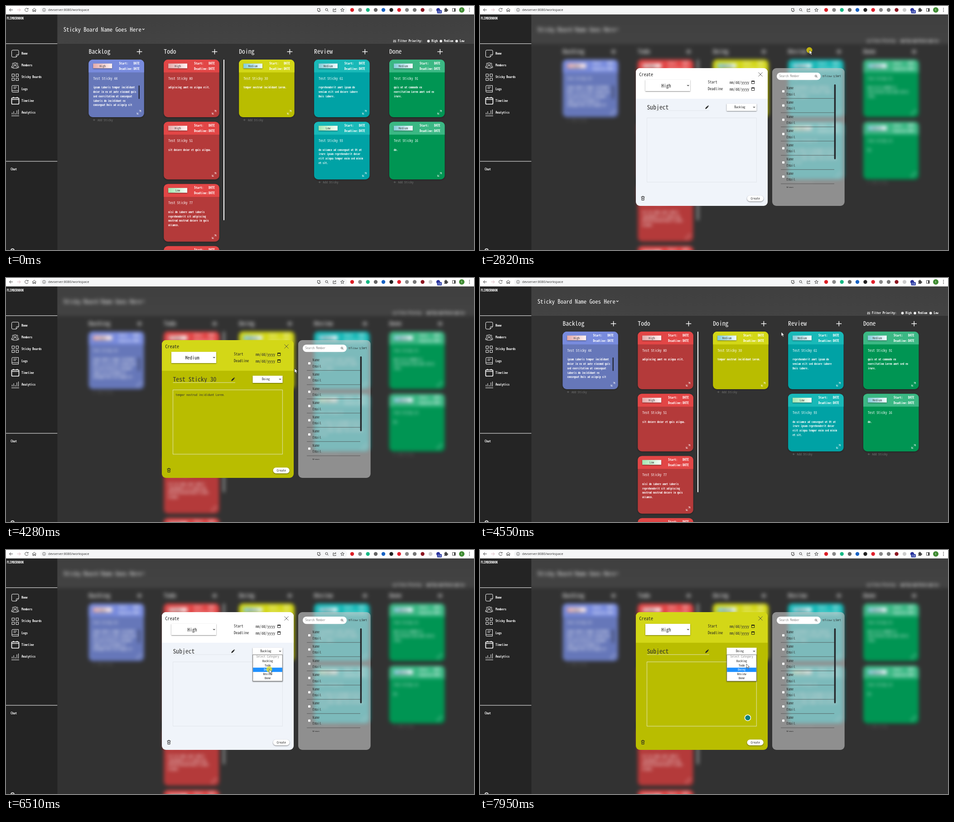
Animation, 1033 px wide and 542 px high, one loop 8 s. Source, as an HTML page:

```html
<!DOCTYPE html>
<html lang="en">
<head>
<meta charset="utf-8">
<title>Sticky board</title>
<style>
html, body { margin: 0; width: 100%; height: 100%; overflow: hidden; background: #323232; }
svg { display: block; width: 1033px; height: 542px; }
text { font-family: "Noto Sans Mono CJK JP", "Noto Sans Mono CJK SC", "Noto Sans Mono", monospace; white-space: pre; }
.ui { font-family: "Open Sans", sans-serif; }
.line { fill: none; stroke: #fff; }
.dark { fill: none; stroke: #444; }
.raised { filter: drop-shadow(0 1px 1.3px rgba(0,0,0,.5)); }
.add { fill: #707070; stroke: #707070; }
.add text { stroke: none; }
.add.hover { fill: #fff; stroke: #fff; }
.blurred { filter: blur(4px); }
</style>
</head>
<body>
<svg id="stage" viewBox="0 0 1033 542">
  <defs>
    <linearGradient id="High"><stop stop-color="#e3aaaa"/><stop offset="1" stop-color="#fff3f3"/></linearGradient>
    <linearGradient id="Medium"><stop stop-color="#83ccd8"/><stop offset="1" stop-color="#f2fcff"/></linearGradient>
    <linearGradient id="Low"><stop stop-color="#a2e6b0"/><stop offset="1" stop-color="#f8fff9"/></linearGradient>
    <linearGradient id="banner" x2="0" y2="1"><stop stop-color="#3d3d3d"/><stop offset="1" stop-color="#434343"/></linearGradient>
    <clipPath id="dialogShape"><rect x="344" y="138" width="291" height="306" rx="9"/></clipPath>
    <clipPath id="listShape"><rect x="645" y="172" width="160" height="232"/></clipPath>
  </defs>
  <g id="board"></g>
  <g id="sidebar"></g>
  <g id="browser"></g>
  <g id="modal"></g>
  <circle id="press" r="6.5" fill="#ffec00" opacity=".68"/>
  <g id="pointer">
    <path id="arrow" d="M0 0V9.2L2.2 7.3L3.7 10.7L5.3 10L3.8 6.7H6.7Z" fill="#fff" stroke="#222" stroke-width=".7"/>
    <path id="beam" d="M-1.7 -4H-.4L0 -3.6L.4 -4H1.7M0 -3.6V3.8M-1.7 4.2H-.4L0 3.8L.4 4.2H1.7" fill="none" stroke="#ddd" stroke-width=".8"/>
  </g>
</svg>
<script>
const $ = id => document.getElementById(id);
const rect = (x, y, w, h, fill, more = '') => `<rect x="${x}" y="${y}" width="${w}" height="${h}" fill="${fill}" ${more}/>`;
const circle = (x, y, r, fill, more = '') => `<circle cx="${x}" cy="${y}" r="${r}" fill="${fill}" ${more}/>`;
const line = (d, width = 1, cls = 'line', more = '') => `<path class="${cls}" d="${d}" stroke-width="${width}" ${more}/>`;
// y is the vertical middle of the capitals
const text = (x, y, size, str, fill = '#fff', more = '') =>
  `<text x="${x}" y="${y + size * .36}" font-size="${size}" ${fill ? `fill="${fill}"` : ''} ${more}>${str}</text>`;
const bold = 'font-weight="700"', middle = 'text-anchor="middle"';

// ---------- board ----------
const LEFT = 182.4, COLUMN = 165.9, ROW = 138.2;
const columns = [
  { name: 'Backlog', head: '#788bdd', body: '#6677b9', cards: [
    ['High', 44, 'ipsum laboris tempor incididunt|dolor in ex ut aute eiusmod quis|sed exercitation ut consequat|laboris do incididunt ex|consequat Duis ad aliquip sit']] },
  { name: 'Todo', head: '#e24646', body: '#b43a3a', cards: [
    ['High', 80, 'adipiscing amet ex aliqua elit.'],
    ['High', 51, 'sit dolore dolor et quis aliqua.'],
    ['Low', 77, 'nisi do labore amet laboris|reprehenderit sit adipiscing|nostrud nostrud dolore in quis|ullamco.'],
    ['High', 12, '']] },
  { name: 'Doing', head: '#d3d717', body: '#b9bd00', cards: [
    ['Medium', 30, 'tempor nostrud incididunt Lorem.']] },
  { name: 'Review', head: '#19b9b8', body: '#00a2a5', cards: [
    ['Medium', 61, 'reprehenderit amet ipsum do|veniam elit sed dolore labore|Duis labore.'],
    ['Low', 93, 'do ullamco ad consequat ut Ut ut|irure ipsum reprehenderit dolor|elit aliqua tempor enim sed minim|et sit.']] },
  { name: 'Done', head: '#3bb884', body: '#009553', cards: [
    ['Medium', 91, 'quis ut ut commodo ex|exercitation Lorem amet sed ex|irure.'],
    ['Medium', 16, 'do.']] }
];

function card(column, [priority, number, body], row) {
  const dates = ['Start:', 'Deadline:'].map((label, i) =>
    text(67, 8.3 + 12 * i, 6.8, label, '#fff', bold) + text(99, 8.3 + 12 * i, 6.8, 'DATE', '#fff', bold)).join('');
  const lines = body.split('|').map((s, i) => text(10, 62.3 + 9.75 * i, 5.95, s, '#fff', bold)).join('');
  return `<g transform="translate(0 ${119 + row * ROW})">
    ${rect(0, 0, 122.4, 128, column.body, 'rx="9" style="filter:drop-shadow(0 1px 1.5px rgba(0,0,0,.4))"')}
    <path d="M0 28.5V9A9 9 0 0 1 9 0H113.4A9 9 0 0 1 122.4 9V28.5Z" fill="${column.head}"/>
    ${rect(9.8, 8.8, 42, 10.6, `url(#${priority})`, 'class="raised"')}
    ${text(30.8, 14.2, 6.8, priority, '#444', middle)}${dates}
    ${text(10, 42.3, 7.7, 'Test Sticky ' + number)}${lines}
    ${line('M106.8 117.5V121.2H110.5M107 121L110 118M111.5 112.8H115.2V116.5M115 113L112 116', .8)}
  </g>`;
}

function drawBoard() {
  let out = rect(80, -20, 1000, 600, '#323232') + rect(80, -20, 1000, 104, 'url(#banner)') +
    text(126.7, 52, 12.75, 'Sticky Board Name Goes Here') + line('M301 50.3L303.3 52.6L305.6 50.3', 1.2) +
    line('M855.5 75V81M857.8 75V81M860.1 75V81M854.6 79H856.4M856.9 77H858.7M859.2 79H861', .8) +
    text(865, 78, 6.75, 'Filter Priority:', '#fff', bold);
  [[932.5, 'High'], [960, 'Medium'], [994.7, 'Low']].forEach(([x, s]) =>
    out += circle(x, 78, 2.9, '#fff', 'stroke="#777" stroke-width=".5"') + text(x + 6.8, 78, 6.8, s, '#fff', bold));
  columns.forEach((column, i) => {
    const bottom = 119 + ROW * (column.cards.length - 1) + 134.2;
    out += `<g transform="translate(${LEFT + i * COLUMN} 0)">
      ${text(0, 101.5, 13.7, column.name)}${line('M106.3 101.5H118M112.2 95.7V107.3', 1.4)}
      ${column.cards.map((c, row) => card(column, c, row)).join('')}
      <g class="add" id="add${column.name}">
        <path d="M9.7 ${bottom}H14.3M12 ${bottom - 2.3}V${bottom + 2.3}" stroke-width=".8"/>
        ${text(19.5, bottom, 6.8, 'Add Sticky', '')}</g>
    </g>`;
  });
  out += rect(292.6, 176.5, 2.3, 30, '#22242e', 'rx="1"') + rect(480, 119, 2, 357, '#fff', 'rx="1"');
  $('board').innerHTML = out;
}

// ---------- sidebar and browser bar ----------
function drawSidebar() {
  const icons = [
    'M15 98H26Q28 98 28 100V108L22.500 113.500H15Q12.500 113.500 12.500 111V100.500Q12.500 98 15 98M28 108H24.500Q22.500 108 22.500 110V113.500',
    'M17.500 128.500a2.600 2.600 0 1 1 5.200 0a2.600 2.600 0 1 1 -5.200 0M15.500 138V136Q15.500 132.700 20.100 132.700T24.700 136V138ZM16 130.800A2 2 0 1 1 17 127M24.200 130.800A2 2 0 1 0 23.200 127M15 137H12.300V135Q12.300 132.500 15.500 132.500M25.200 137H27.900V135Q27.900 132.500 24.700 132.500',
    'M13 151H18.500V156.500H13ZM22 151H27.500V156.500H22ZM13 160H18.500V165.500H13ZM22 160H27.500V165.500H22Z',
    'M15 176.500H27.500V191.500H15Q13 191.500 13 189.500V178.500Q13 176.500 15 176.500M13 188H27.500M16.500 180H24M16.500 183H22',
    'M14.500 204H26.500Q28.500 204 28.500 206V216Q28.500 218 26.500 218H14.500Q12.500 218 12.500 216V206Q12.500 204 14.500 204M12.500 207.500H28.500M16.500 202V205M24.500 202V205',
    'M12 244H29M13.500 241V237M17 241V234M20.500 241V238M24 241V232M27.500 241V230'
  ];
  const labels = ['Home', 'Members', 'Sticky Boards', 'Logs', 'Timeline', 'Analytics'];
  $('sidebar').innerHTML = rect(0, 0, 113.3, 542, '#242424') +
    text(1.7, 27.5, 6.8, 'FLIMBERNOOK', '#fff', bold) + line('M0 83.7H113.3M0 345H113.3') +
    labels.map((s, i) => line(icons[i], i === 4 ? 1.7 : 1) + text(34.3, 105.5 + 26.25 * i, 6.85, s, '#fff', bold)).join('') +
    text(10.3, 362.3, 6.8, 'Chat', '#fff', bold) + circle(14.500, 543, 3.6, 'none', 'stroke="#fff" stroke-width="1.7"');
}

function drawBrowser() {
  const grey = d => line(d, 1, 'dark');
  const extensions = [[764, '#dc1f26'], [781.5, '#8a8a8a'], [798.700, '#16b884'], [816, '#666'], [833, '#1762c4'],
    [850.5, '#222'], [867.700, '#e0202c'], [885, '#888'], [902, '#777'], [919.500, '#8c1520'], [937, '#ccc'], [954, '#28309a']];
  $('browser').innerHTML = rect(0, 0, 1033, 18.700, '#fff') + rect(75, 1.500, 678, 14.500, '#f5f6f7', 'rx="7.200"') +
    grey('M15 8.700H7.500M11 5.200L7.500 8.700L11 12.200') +
    line('M24.500 8.700H32M28.500 5.200L32 8.700L28.500 12.200', 1, '', 'fill="none" stroke="#d9b5bd"') +
    grey('M48.500 6.500A3.700 3.700 0 1 0 49 9.700M49 4.500V7H46.500') +
    grey('M58 8.800L62.300 4.800L66.600 8.800M59.300 8V12.500H61.200V9.500H63.500V12.500H65.300V8') +
    circle(84, 8.700, 3.500, 'none', 'stroke="#555" stroke-width=".8"') + grey('M84 8.300V10.700M84 6.500V7.300') +
    text(93, 8.800, 7.250, 'devserver:8080/workspace', '#333', 'class="ui"') +
    grey('M691 5.500H687.500V11H694V9M689 12.500H692.500M692.500 4.500V8M691 6.800L692.500 8.300L694 6.800') +
    grey('M705 8a2.500 2.500 0 1 1 5 0a2.500 2.500 0 1 1 -5 0M709.500 10L711.700 12.200') +
    grey('M724 6.500H722V12.500H728V10.500M723.700 10Q724 7 728 7M726.500 5L728.500 7L726.500 9') +
    grey('M742.500 4.800L743.600 7.400L746.400 7.600L744.300 9.500L744.900 12.300L742.500 10.800L740.100 12.300L740.700 9.500L738.600 7.600L741.400 7.400Z') +
    extensions.map(([x, c]) => circle(x, 8.700, 4.200, c)).join('') +
    rect(951.500, 9, 10.500, 7.500, '#3949ab', 'rx="1.500"') + text(956.700, 12.800, 6, '14', '#fff', 'class="ui" ' + middle) +
    '<path d="M967.500 6H969.700A1.400 1.400 0 1 1 972.300 6H974V8A1.400 1.400 0 1 1 974 10.500V12.700H967.500V10.500A1.400 1.400 0 0 0 967.500 8Z" fill="#444"/>' +
    grey('M985.500 5.500H992V12H985.500Z') + rect(989, 5.500, 3, 6.500, '#444') +
    circle(1006, 8.700, 6, '#3f8b32') + text(1006, 8.300, 6.500, 't', '#fff', 'class="ui" ' + middle) +
    [5.200, 8.700, 12.200].map(y => circle(1023, y, .9, '#444')).join('');
}

// ---------- modal ----------
const chevron = (x, y) => line(`M${x - 2} ${y - 1}L${x} ${y + 1}L${x + 2} ${y - 1}`, 1.200, 'dark');
const options = ['Select Category', 'Backlog', 'Todo', 'Doing', 'Review', 'Done'];
const optionY = i => 237 + 9.550 * i;

function dateField(label, y) {
  return text(503, y, 8.250, label, '#222') + text(551, y, 8.600, 'mm/dd/yyyy', '#333') +
    line(`M599.500 ${y - 3}H605.700V${y + 3}H599.500Z`, .9, 'dark', 'style="stroke:#111"') + rect(599.500, y - 3.500, 6.200, 2, '#111');
}

function memberPanel() {
  let rows = '';
  for (let i = 0; i < 8; i++) {
    const y = 182.700 + 31.600 * i;
    rows += text(676.500, y, 7.750, 'Name', '#333') + text(676.500, y + 13.400, 7.750, 'Email', '#333') +
      rect(667, y + 4.300, 5, 5, '#fff', 'rx=".7"') + line(`M664 ${y + 22.600}H782`, .7, 'dark');
  }
  return rect(645, 138, 159.700, 306, '#c8c8c8', 'rx="9" opacity=".62"') + rect(655, 148, 97, 16.300, '#fff', 'rx="8.100"') +
    text(660.500, 156, 6.850, 'Search Member', '#888') +
    line('M739.500 155.500a1.900 1.900 0 1 1 3.800 0a1.900 1.900 0 1 1 -3.800 0M743 157L744.800 158.800', .9, 'dark') +
    line('M756 154.500H759.500M756 156H759.500M756.700 157.500H758.800', .7, 'dark') + text(761, 156, 5.500, 'Filter', '#222') +
    line('M780.700 154V158.500M782.700 154V158.500M780 155L780.700 154M782.700 158.500L783.500 157.500', .6, 'dark') + text(785, 156, 5.800, 'Sort', '#222') +
    `<g clip-path="url(#listShape)">${rows}</g>` + rect(781.700, 174, 3.500, 166.500, '#25282c', 'rx="1.700"');
}

function drawModal() {
  const menu = rect(544.800, 232.800, 65.400, 58.400, '#fff', 'stroke="#666" stroke-width=".8" class="raised"') +
    rect(545.200, 0, 64.600, 9.500, '#1e90ff', 'id="marker"') +
    options.map((s, i) => text(577.700, optionY(i), 6.700, s, i ? '#222' : '#888', `${middle} class="option"`)).join('');
  $('modal').innerHTML = `<g clip-path="url(#dialogShape)">
      ${rect(344, 138, 291, 306, '', 'id="dialogBody"')}${rect(344, 138, 291, 68, '', 'id="dialogHead"')}</g>` +
    text(351.500, 152.200, 10.200, 'Create', '#222') + line('M614.500 147.500L623.500 156.500M623.500 147.500L614.500 156.500', .9, 'dark') +
    rect(365, 164, 99, 25, '#fff', 'class="raised"') + text(411, 177, 10.400, 'High', '#222', middle + ' id="priority"') + chevron(459.300, 176.500) +
    dateField('Start', 169.500) + dateField('Deadline', 184.500) +
    text(368.500, 225, 13.700, 'Subject', '#333', 'id="subject"') +
    '<path d="M497.300 228.700L497.800 226.300L502.300 221.800L504.200 223.700L499.700 228.200ZM502.900 221.200L503.600 220.600L505.500 222.400L504.800 223.100Z" fill="#222"/>' +
    '<g id="fields" fill="none"><path d="M368.500 232.300H506"/><rect x="368.500" y="248.500" width="241.800" height="142.800"/></g>' +
    text(368.500 + 6, 260, 6.800, 'tempor nostrud incididunt Lorem.', '#333', 'id="note"') +
    rect(544.500, 217, 66, 16, '#fff', 'class="raised"') + text(573.500, 225, 6.900, '', '#222', middle + ' id="category"') + chevron(605, 224.700) +
    line('M355.500 424H363.500M358 424V422.700H361V424M356.500 424L357 431.500H362L362.500 424M358.600 426V429.500M360.400 426V429.500', .9, 'dark', 'style="stroke:#222"') +
    rect(589.500, 421, 36.300, 13, '#fff', 'rx="6.500" class="raised"') + text(607.600, 427.500, 6.800, 'Create', '#222', middle) +
    circle(591, 372.700, 6.500, '#10807a', 'id="bubble" stroke="#fff" stroke-width="1.500"') +
    memberPanel() + `<g id="menu">${menu}</g>`;
}

// ---------- timeline ----------
const LOOP = 8000;
const path = [ // time, x, y
  [490, 985, 510], [1050, 538, 228], [1250, 588, 244], [1670, 543, 254], [2200, 543, 254], [2760, 727, 98],
  [2900, 727, 98], [3220, 627, 101], [3340, 627, 101], [3560, 665, 112], [3680, 665, 112], [3920, 624.500, 237],
  [4200, 624.500, 237], [4420, 665, 120], [4600, 665, 120], [5250, 627, 102], [5450, 627, 102],
  [5770, 605, 121], [6020, 580, 225], [6150, 579, 226], [6480, 581, 265], [6590, 581, 265],
  [6960, 480, 340], [7080, 480, 340], [7380, 360, 414], [7690, 578, 226], [7800, 578, 226], [7930, 588, 253], [LOOP, 588, 253]
];
const presses = [[2140, 2230], [2780, 2890], [3240, 3330], [3590, 3670], [4140, 4220], [4410, 4500],
  [5330, 5430], [6050, 6130], [6470, 6590], [6980, 7060], [7710, 7790]];
const modals = [[2210, 2900], [3300, 3650], [4200, 4480], [5400, LOOP]];
const menus = [[6100, 6590], [7760, LOOP]];
const during = (spans, t) => spans.some(([from, to]) => t >= from && t < to);
const show = (id, on) => $(id).style.display = on ? '' : 'none';

function pointerAt(t) {
  const next = Math.max(1, path.findIndex(p => p[0] > t));
  const [t0, x0, y0] = path[next - 1], [t1, x1, y1] = path[next];
  const k = Math.max(0, (t - t0) / (t1 - t0)), e = k * k * (3 - 2 * k);
  return [x0 + (x1 - x0) * e, y0 + (y1 - y0) * e];
}

function render(t) {
  const [x, y] = pointerAt(t);
  const open = during(modals, t), viewing = open && during([[4200, 4480]], t);
  const doing = viewing || t >= 6600, menu = during(menus, t);
  const overAdd = !open && x > 523 && x < 570 && y > 248 && y < 258;
  $('board').setAttribute('class', open ? 'blurred' : '');
  $('addDoing').setAttribute('class', overAdd ? 'add hover' : 'add');

  show('modal', open);
  $('dialogHead').setAttribute('fill', doing ? columns[2].head : '#fff');
  $('dialogBody').setAttribute('fill', doing ? columns[2].body : '#f0f4fa');
  $('fields').setAttribute('stroke', doing ? '#e2e4b4' : '#e2e6ec');
  $('category').textContent = doing ? 'Doing' : 'Backlog';
  $('priority').textContent = viewing ? 'Medium' : 'High';
  $('subject').textContent = viewing ? 'Test Sticky 30' : 'Subject';
  show('note', viewing);
  show('bubble', t >= 7100);

  show('menu', menu);
  const hovered = doing ? 3 : Math.min(5, Math.max(1, Math.round((y - 237) / 9.550)));
  $('marker').setAttribute('y', optionY(hovered) - 4.300);
  document.querySelectorAll('.option').forEach((o, i) => o.setAttribute('fill', i === hovered ? '#fff' : i ? '#222' : '#888'));

  show('pointer', t >= 490);
  $('pointer').setAttribute('transform', `translate(${x} ${y})`);
  show('beam', overAdd);
  show('arrow', !overAdd);
  show('press', during(presses, t));
  $('press').setAttribute('cx', x);
  $('press').setAttribute('cy', y);
}

drawBoard();
drawSidebar();
drawBrowser();
drawModal();
const start = performance.now();
(function frame() {
  render((performance.now() - start) % LOOP);
  requestAnimationFrame(frame);
})();
</script>
</body>
</html>
```
